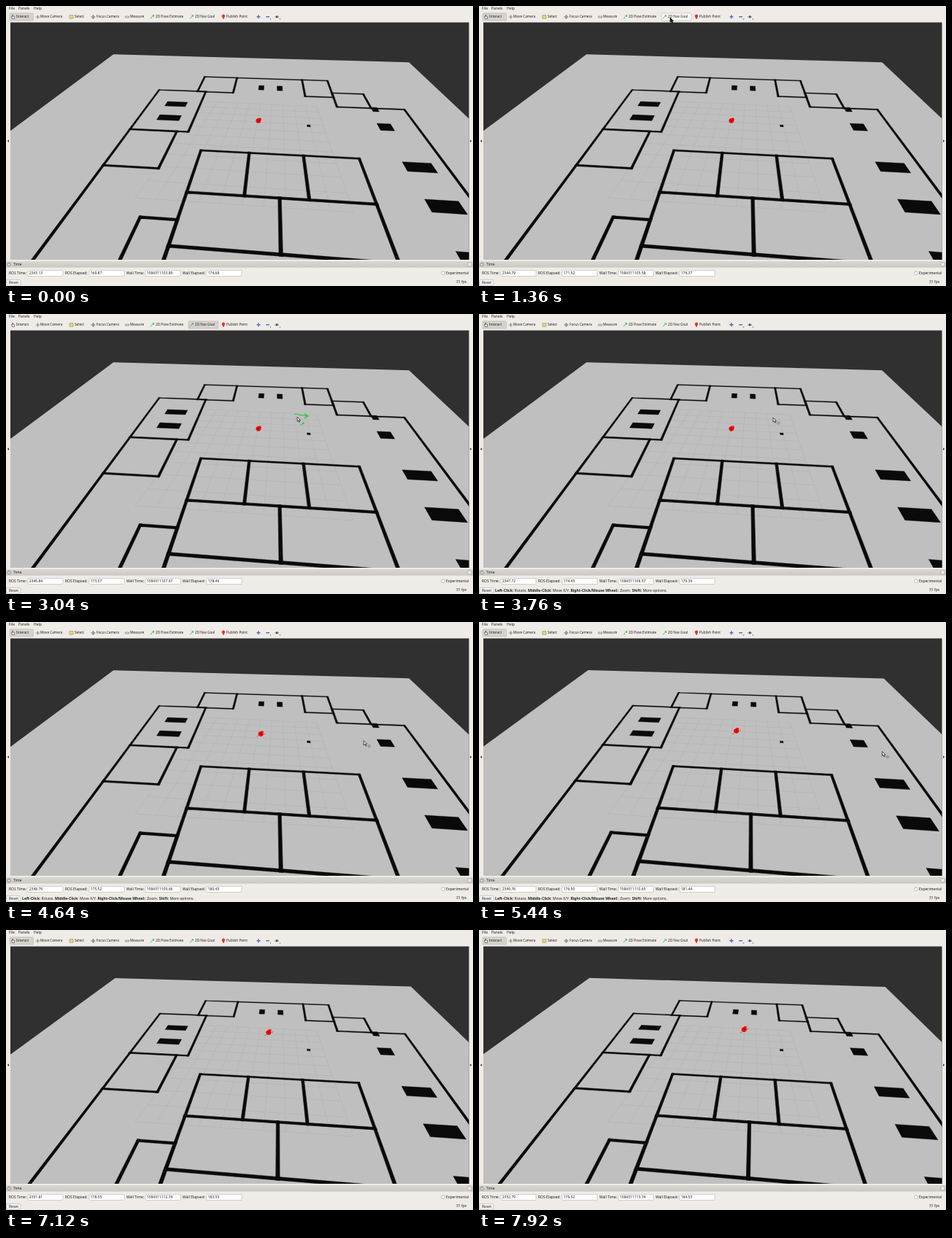
Recreate the animation shown at these times as an HTML page. Size 640 by 384 pixels, loop 8 s.

```html
<!DOCTYPE html>
<html lang="en">
<head>
<meta charset="utf-8">
<title>Robot navigation view</title>
<style>
html, body { margin: 0; width: 100%; height: 100%; overflow: hidden; background: #efebe7; }
svg { display: block; width: 640px; height: 384px; }
text { font-family: "Noto Sans", "Open Sans", sans-serif; font-size: 5px; fill: #222; white-space: pre; }
.tool { font-size: 4.7px; }
.status { font-size: 5.1px; }
.b { font-weight: 700; }
</style>
</head>
<body>
<svg viewBox="0 0 640 384" xmlns="http://www.w3.org/2000/svg">
  <defs>
    <clipPath id="view"><rect x="6" y="22.5" width="628.5" height="325.5"/></clipPath>
    <linearGradient id="bar" x2="0" y2="1"><stop stop-color="#dad6d2"/><stop offset="1" stop-color="#ccc8c3"/></linearGradient>
  </defs>
  <rect width="640" height="384" fill="#efebe7"/>
  <g id="buttons"></g>
  <g id="bars"></g>
  <g clip-path="url(#view)">
    <rect x="6" y="22" width="629" height="327" fill="#303030"/>
    <path id="ground" fill="#bfbfbf"/>
    <path id="grid" fill="none" stroke="#a4a4a4" stroke-width=".5" opacity=".6"/>
    <path id="walls" fill="#0a0a0a" stroke="#0a0a0a" stroke-width=".4"/>
    <path id="goal" d="M395 137L413 140M409 137L414 140L409 143" fill="none" stroke="#18d030" stroke-width="1.2"/>
    <g id="robot">
      <path id="cloud" stroke="#ff3a30" stroke-width=".9"/>
      <path d="M-3.6 0Q-3.5-3 0-3.2L2.6-4L3.9-2.4L3.3.8Q2.8 3.4-.2 3.5Q-3.3 3.4-3.6 0Z" fill="#ee0808"/>
      <path d="M-1.2-.6L1.2-1.5L1 .8L-.6 1Z" fill="#b00000"/>
    </g>
  </g>
  <g id="panel"></g>
  <g id="cursor">
    <path id="pointer" d="M0 0V6.2L1.5 4.9L2.6 7.3L3.6 6.8L2.6 4.5H4.5Z" stroke="#111" stroke-width=".7"/>
    <path id="navIcon" d="M4.5 11.5L9.3 8M7 8.2L9.5 7.8L8.7 10.2" fill="none" stroke="#20c840"/>
    <path id="moveIcon" d="M5 7.5A2.4 1.2 0 1 0 9.8 7.5A2.4 1.2 0 1 0 5 7.5M7.4 5.3V9.8" fill="none" stroke="#777" stroke-width=".6"/>
  </g>
</svg>
<script>
const $ = id => document.getElementById(id);
const LOOP = 8000, STEP = 80;

function add(parent, tag, attrs, text = "") {
  const el = document.createElementNS("http://www.w3.org/2000/svg", tag);
  for (const k in attrs) el.setAttribute(k, attrs[k]);
  el.textContent = text;
  parent.append(el);
  return el;
}
const box = (p, x, y, width, height, fill, stroke = "none", rx = 0) =>
  add($(p), "rect", { x, y, width, height, fill, stroke, rx, "stroke-width": .6 });
const label = (p, x, y, s, cls = "") => add($(p), "text", { x, y, class: cls }, s);
const line = (d, stroke, width = .8, fill = "none") =>
  add($("bars"), "path", { d, fill, stroke, "stroke-width": width });
const show = (el, on) => el.setAttribute("visibility", on ? "visible" : "hidden");
const ramp = (t, from, to) => Math.min(1, Math.max(0, (t - from) / (to - from)));
const ease = u => u * u * (3 - 2 * u);
const mix = (a, b, u) => a + (b - a) * u;

// Perspective map from the unit square to a screen quad
function projector(a, b, c, d) {
  const sx = a[0] - b[0] + c[0] - d[0], sy = a[1] - b[1] + c[1] - d[1];
  const x1 = b[0] - c[0], y1 = b[1] - c[1], x2 = d[0] - c[0], y2 = d[1] - c[1];
  const det = x1 * y2 - x2 * y1, g = (sx * y2 - x2 * sy) / det, h = (x1 * sy - sx * y1) / det;
  return (u, v) => [0, 1].map(i =>
    ((a[i] + (b[i] - a[i] + g * b[i]) * u + (d[i] - a[i] + h * d[i]) * v) / (1 + g * u + h * v)).toFixed(2));
}
const toScreen = projector([210, 115], [534.5, 126.7], [744.6, 408.2], [37, 348]);

// Floor plan: rectangles [left, far, right, near] in building units
const plan = [];
const WALL_U = .004, WALL_V = .005, FRONT = 1.15;
const block = (u, v, w, h) => plan.push([u, v, u + w, v + h]);
const wall = (u1, v1, u2, v2) => plan.push([u1 - WALL_U, v1 - WALL_V, u2 + WALL_U, v2 + WALL_V]);
function room(u1, v1, u2, v2) {
  wall(u1, v1, u2, v1);
  wall(u1, v2, u2, v2);
  wall(u1, v1, u1, v2);
  wall(u2, v1, u2, v2);
}

function buildPlan() {
  room(0, 0, .207, .387);
  room(0, .387, .167, .626);
  room(.171, -.193, .326, .003);
  room(.63, -.193, .746, .015);
  room(.746, -.036, .876, .115);
  room(.181, .843, .272, FRONT);
  [.272, .424, .59].forEach((u, i, cols) => room(u, .509, cols[i + 1] || .756, .732));
  room(.272, .732, .515, .93);
  room(.515, .732, .756, .93);
  wall(.326, -.193, .63, -.193);
  wall(.876, .115, 1, .115);
  wall(1, .115, 1, FRONT);
  for (const [u, v] of [[0, .626], [.272, .93], [.756, .93]]) wall(u, v, u, FRONT);

  for (let i = 0; i < 2; i++) {
    block(.069 + .003 * i, .127 + .13 * i, .083, .045);
    block(.433 + .081 * i, -.098, .023, .055);
  }
  for (let i = 0; i < 3; i++) block(.879 + .003 * i, .515 + .183 * i, .082, .052);
  block(.866, .252, .047, .055);
  block(.876, .106, .023, .04);
  block(.617, .29, .011, .014);
}

// A localisation correction turns the map slightly against the fixed frame
function drawMap(turn) {
  const at = (u, v) => toScreen(u - .0175 * turn * (v - .25), v + .012 * turn * (u - .45));
  const quad = ([l, f, r, n]) => `M${at(l, f)}L${at(r, f)}L${at(r, n)}L${at(l, n)}Z`;
  $("ground").setAttribute("d", quad([-.411, -.53, 1.209, 1.3]));
  $("walls").setAttribute("d", plan.map(quad).join(""));
}

function buildGrid() {
  const at = projector([274, 131], [426, 138], [476, 283], [177, 263]);
  let d = "";
  for (let n = 0; n <= 1.01; n += .1) d += `M${at(n, 0)}L${at(n, 1)}M${at(0, n)}L${at(1, n)}`;
  $("grid").setAttribute("d", d);
}

// Loose pose guesses scattered around the robot
function buildCloud() {
  let seed = 7, d = "";
  const rnd = () => (seed = seed * 16807 % 2147483647) / 2147483647 - .5;
  for (let i = 0; i < 14; i++) d += `M${rnd() * 11 - 1} ${rnd() * 6}l2.4 ${rnd()}`;
  $("cloud").setAttribute("d", d);
}

function buildBars() {
  [[4, "File"], [17, "Panels"], [38, "Help"]].forEach(([x, s]) => label("bars", x, 5.2, s));
  [[14, "Interact"], [47, "Move Camera"], [94, "Select"], [124, "Focus Camera"], [170, "Measure"],
   [205, "2D Pose Estimate"], [259, "2D Nav Goal"], [302, "Publish Point"]]
    .forEach(([x, s]) => label("bars", x, 16.4, s, "tool"));
  line("M8.5 17.5L7.5 14.5L8.7 15V12.2H9.6V14L11.8 14.6L11.3 17.5Z", "#444", .7, "#fff");
  line("M43.5 12V18M40.5 15H46.5M42 13.5L45 16.5M45 13.5L42 16.5", "#777", .6);
  line("M87 12.7H92V17.2H87Z", "#8a8a60", .6, "#e6d878");
  line("M119.5 12V18M116.5 15H122.5M117.7 15A1.8 1.8 0 1 0 121.3 15A1.8 1.8 0 1 0 117.7 15", "#666", .6);
  line("M163.5 14H168.5V16H163.5Z", "#777", .6, "#ddd");
  for (const x of [198, 252]) line(`M${x} 17.3l4.5-4.5m-2 0h2v2`, "#26c345", 1);
  line("M298 18L296.2 14.3A1.9 1.9 0 1 1 299.8 14.3Z", "#c22", .4, "#e03028");
  line("M343.5 14.8H348.5M346 12.3V17.3M356.3 14.8H361", "#4a78b8", 1.5);
  line("M361.5 17.5h2l-1 1.2ZM374.5 17.5h2l-1 1.2Z", "none", 0, "#444");
  line("M368.5 14.8Q371.2 11.8 374 14.8Q371.2 17.6 368.5 14.8Z", "#667", .6, "#fff");
  line("M371.2 13.6V16", "#335", 2);
  line("M4 183.3v3.7l-2.2-1.8ZM636 183.3v3.7l2.2-1.8Z", "none", 0, "#333");
}

function buildPanel() {
  box("panel", 0, 348, 640, 36, "#efebe7");
  box("panel", 0, 350, 640, 8.7, "url(#bar)");
  box("panel", 2, 352.2, 4.5, 4.5, "#fff", "#444", 2.3);
  add($("panel"), "path", { d: "M4.2 353V354.7H5.4", fill: "none", stroke: "#333", "stroke-width": .5 });
  label("panel", 10, 356.4, "Time");
  box("panel", 633, 351.8, 5, 5, "#eeedeb", "#999", .5);
  box("panel", 597, 364.2, 4, 4, "#fff", "#999", .5);
  label("panel", 603, 368.2, "Experimental");
  box("panel", .8, 375.4, 19.2, 7.8, "#f6f4f2", "#b2afab", 1);
  label("panel", 4, 381.2, "Reset");
  label("panel", 617, 380, "31 fps");
}

function buildField(x, fieldX, name) {
  label("panel", x, 368.3, name);
  box("panel", fieldX, 362.6, 48, 8, "#fff", "#b5b2ae", .8);
  return label("panel", fieldX + 1.7, 368.3, "");
}

function buildStatus() {
  const el = label("panel", 22, 381.2, "", "status");
  ["Left-Click:", " Rotate. ", "Middle-Click:", " Move X/Y. ", "Right-Click/Mouse Wheel:", ": Zoom. ", "Shift:", " More options."]
    .forEach((s, i) => add(el, "tspan", { class: i % 2 ? "" : "b" }, s));
  return el;
}

// Pointer moves: start, end, x, y
const ENTRY = [645, 120];
const MOVES = [
  [560, 1200, 262, 16], [1840, 2320, 385, 138], [2480, 3280, 403, 142],
  [3840, 5280, 552.5, 177.5], [5520, 5920, 648, 195]];
const pointerAt = t => MOVES.reduce(([x, y], [from, to, toX, toY]) => {
  const u = ease(ramp(t, from, to));
  return [mix(x, toX, u), mix(y, toY, u)];
}, ENTRY);

function drawClock(t) {
  const ros = 2343.13 + t * .0012195;
  const wall = ros - 2239.24 + t * .000024;
  const values = [ros, ros - 2173.265, wall, wall + 70.79].map(v => v.toFixed(2));
  values[2] = "1584311" + values[2];
  fields.forEach((f, i) => { f.textContent = values[i]; });
}

function drawPointer(t) {
  const [x, y] = pointerAt(t);
  const nav = t >= 1840 && t < 3360;
  const inView = x > 6 && x < 634 && y > 22;
  const hover = x > 250 && x < 291 && y < 21;
  $("cursor").setAttribute("transform", `translate(${x} ${y})`);
  $("pointer").setAttribute("fill", inView ? "#eee" : "#111");
  show($("cursor"), x < 640);
  show($("navIcon"), nav && inView);
  show($("moveIcon"), !nav && inView);
  show(status, !nav && inView);
  show(interactBtn, !nav);
  show(navBtn, nav || hover);
  navBtn.setAttribute("fill", nav ? "#d6d2ce" : "#f8f6f4");
  show($("goal"), t >= 2720 && t < 3280);
}

function drawRobot(t) {
  const u = ramp(t, 3900, 7920), start = ramp(t, 3900, 5000);
  $("robot").setAttribute("transform",
    `translate(${mix(346, 363.3, u)} ${mix(157.3, 136.3, u)}) rotate(${-18 * start})`);
  $("cloud").setAttribute("opacity", start);
}

function draw(time) {
  const t = Math.floor(time / STEP) * STEP;
  drawClock(t);
  drawPointer(t);
  drawRobot(t);
  drawMap(t < 4720 ? 0 : t < 7440 ? .55 : 1);
}

const interactBtn = box("buttons", 5, 9.8, 32.5, 10.2, "#d6d2ce", "#b9b5b0", 1);
const navBtn = box("buttons", 250, 9.8, 41, 10.2, "#d6d2ce", "#b9b5b0", 1);
buildPlan();
buildGrid();
buildCloud();
buildBars();
buildPanel();
const fields = [[4, 30, "ROS Time:"], [81, 114, "ROS Elapsed:"], [165, 191, "Wall Time:"], [242, 275, "Wall Elapsed:"]]
  .map(f => buildField(...f));
const status = buildStatus();

function tick() {
  draw(performance.now() % LOOP);
  requestAnimationFrame(tick);
}
tick();
</script>
</body>
</html>
```
